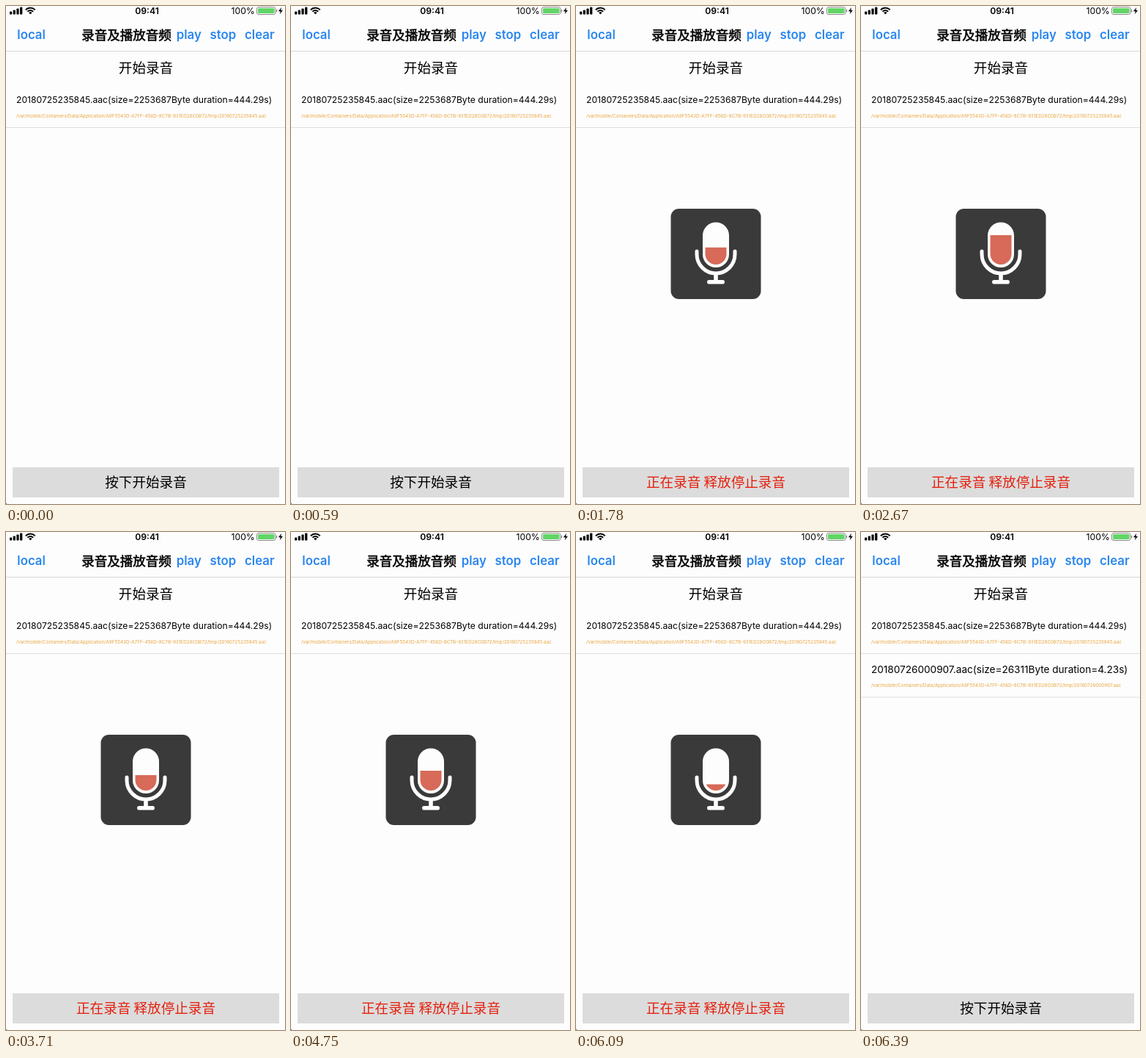
Write an HTML page with a canvas that moves like this. It is 381x678 px and loops after 8000 ms.

```html
<!DOCTYPE html>
<html lang="zh">
<head>
<meta charset="utf-8">
<style>
  html, body { margin: 0; width: 100%; height: 100%; overflow: hidden; background: #fdfdfd; }
  canvas { display: block; width: 381px; height: 678px; }
</style>
</head>
<body>
<canvas id="stage"></canvas>
<script>
const W = 381, H = 678, LOOP = 8000;
const RECORD_START = 890, RECORD_END = 6390, TICK = 148.4;
const LATIN = 'Inter, sans-serif';
const HAN = '"Noto Sans CJK SC", "Noto Sans CJK", sans-serif';
const PAPER = '#fdfdfd', BLUE = '#2b87ee', RED = '#e5210f';
const FOLDER = '/var/mobile/Containers/Data/Application/A9F5543D-A7FF-456D-8C7B-931ED28C0B72/tmp/';

// Top edge of the volume meter: [tick, y]
const METER = [
  [6, 345], [13, 326], [16, 316], [17, 316], [18, 312], [25, 331], [26, 352], [27, 352],
  [28, 328], [29, 328], [30, 329], [32, 325], [36, 325], [40, 341], [42, 346]
];

const canvas = document.getElementById('stage');
const ctx = canvas.getContext('2d');
const scale = window.devicePixelRatio || 1;
canvas.width = W * scale;
canvas.height = H * scale;
ctx.scale(scale, scale);

function text(str, x, y, font, color = '#000', align = 'left') {
  ctx.font = font;
  ctx.fillStyle = color;
  ctx.textAlign = align;
  ctx.fillText(str, x, y);
}

function rect(x, y, w, h, color) {
  ctx.fillStyle = color;
  ctx.fillRect(x, y, w, h);
}

function roundPath(x, y, w, h, r) {
  ctx.beginPath();
  ctx.roundRect(x, y, w, h, r);
}

function roundRect(x, y, w, h, r, color) {
  roundPath(x, y, w, h, r);
  ctx.fillStyle = color;
  ctx.fill();
}

function meterTop(time) {
  const tick = Math.floor(time / TICK + 0.05);
  const next = METER.findIndex(key => key[0] >= tick);
  if (next < 0) return METER[METER.length - 1][1];
  if (next === 0) return METER[0][1];
  const [t0, y0] = METER[next - 1], [t1, y1] = METER[next];
  return y0 + (y1 - y0) * (tick - t0) / (t1 - t0);
}

function drawWifi(x, y) {
  const from = -Math.PI * 0.76, to = -Math.PI * 0.24;
  ctx.strokeStyle = '#000';
  ctx.lineCap = 'butt';
  ctx.lineWidth = 2;
  for (const r of [5.3, 8.8]) {
    ctx.beginPath();
    ctx.arc(x, y, r, from, to);
    ctx.stroke();
  }
  ctx.beginPath();
  ctx.moveTo(x, y);
  ctx.arc(x, y, 3, from, to);
  ctx.fillStyle = '#000';
  ctx.fill();
}

function drawStatusBar() {
  for (let i = 0; i < 4; i++) {
    const h = 4 + i * 2;
    roundRect(5 + i * 4.7, 11.5 - h, 3.2, h, 0.8, '#000');
  }
  drawWifi(33.3, 11.3);
  text('09:41', 192.5, 11, '600 12.2px ' + LATIN, '#000', 'center');
  text('100%', 307.5, 11, '12.2px ' + LATIN);

  roundPath(342.5, 1.5, 25.5, 10, 2.5);
  ctx.strokeStyle = '#8a8a8a';
  ctx.lineWidth = 1;
  ctx.stroke();
  roundRect(344, 3, 22.5, 7, 1.2, '#62d567');
  roundRect(368.8, 4.7, 1.4, 3.8, 0.7, '#8a8a8a');

  ctx.beginPath();
  ctx.moveTo(376.2, 1.8);
  ctx.lineTo(372, 7.2);
  ctx.lineTo(374.8, 7.2);
  ctx.lineTo(373.8, 11.2);
  ctx.lineTo(378, 5.8);
  ctx.lineTo(375.2, 5.8);
  ctx.closePath();
  ctx.fillStyle = '#000';
  ctx.fill();
}

// A thin outline turns the regular weight into a medium one.
function drawTitle(str, x, y) {
  text(str, x, y, '17.5px ' + HAN, '#000', 'center');
  ctx.strokeStyle = '#000';
  ctx.lineWidth = 0.55;
  ctx.strokeText(str, x, y);
}

function drawNavigation() {
  const font = '600 16.8px ' + LATIN;
  text('local', 15.3, 45, font, BLUE);
  drawTitle('录音及播放音频', 164.5, 45.7);
  text('play', 232.7, 45, font, BLUE);
  text('stop', 278.5, 45, font, BLUE);
  text('clear', 326, 45, font, BLUE);
  rect(0, 61, W, 1, '#d9d9d9');
}

function drawRow(y, name, details, size) {
  text(`${name}(${details})`, 14, y + 26.3, size + 'px ' + LATIN);
  text(FOLDER + name, 14, y + 45.7, '6.33px ' + LATIN, '#e9a540');
  rect(0, y + 59, W, 1, '#dfdfdf');
}

function drawButton(recording) {
  rect(9, 628, 364, 41, '#dcdcdc');
  text(recording ? '正在录音 释放停止录音' : '按下开始录音', 191, 655.3,
    '18.6px ' + HAN, recording ? RED : '#000', 'center');
}

function drawMicrophone(top) {
  roundRect(129.5, 276, 123, 123, 11, '#3a3a3a');
  roundRect(173, 294.5, 36, 61.5, 18, PAPER);

  ctx.save();
  roundPath(176.5, 298, 29, 54, 14.5);
  ctx.clip();
  rect(176, top, 30, 353 - top, '#d76a58');
  ctx.restore();

  ctx.strokeStyle = PAPER;
  ctx.lineCap = 'round';
  ctx.lineWidth = 5;
  ctx.beginPath();
  ctx.moveTo(165, 334);
  ctx.lineTo(165, 338);
  ctx.arc(191, 338, 26, Math.PI, 0, true);
  ctx.lineTo(217, 334);
  ctx.stroke();
  rect(188.2, 364, 5.6, 11, PAPER);
  roundRect(179, 373, 24, 5.6, 2.8, PAPER);
}

function draw(time) {
  const recording = time >= RECORD_START && time < RECORD_END;
  rect(0, 0, W, H, PAPER);
  drawStatusBar();
  drawNavigation();
  text('开始录音', 191, 91.3, '18.6px ' + HAN, '#000', 'center');
  drawRow(106, '20180725235845.aac', 'size=2253687Byte duration=444.29s', 12.17);
  if (time >= RECORD_END) {
    drawRow(165.5, '20180726000907.aac', 'size=26311Byte duration=4.23s', 13.58);
  }
  drawButton(recording);
  rect(0, 677, 1, 1, '#555');
  if (recording) drawMicrophone(meterTop(time));
}

const start = performance.now();
function loop() {
  draw((performance.now() - start) % LOOP);
  requestAnimationFrame(loop);
}
loop();
</script>
</body>
</html>
```
